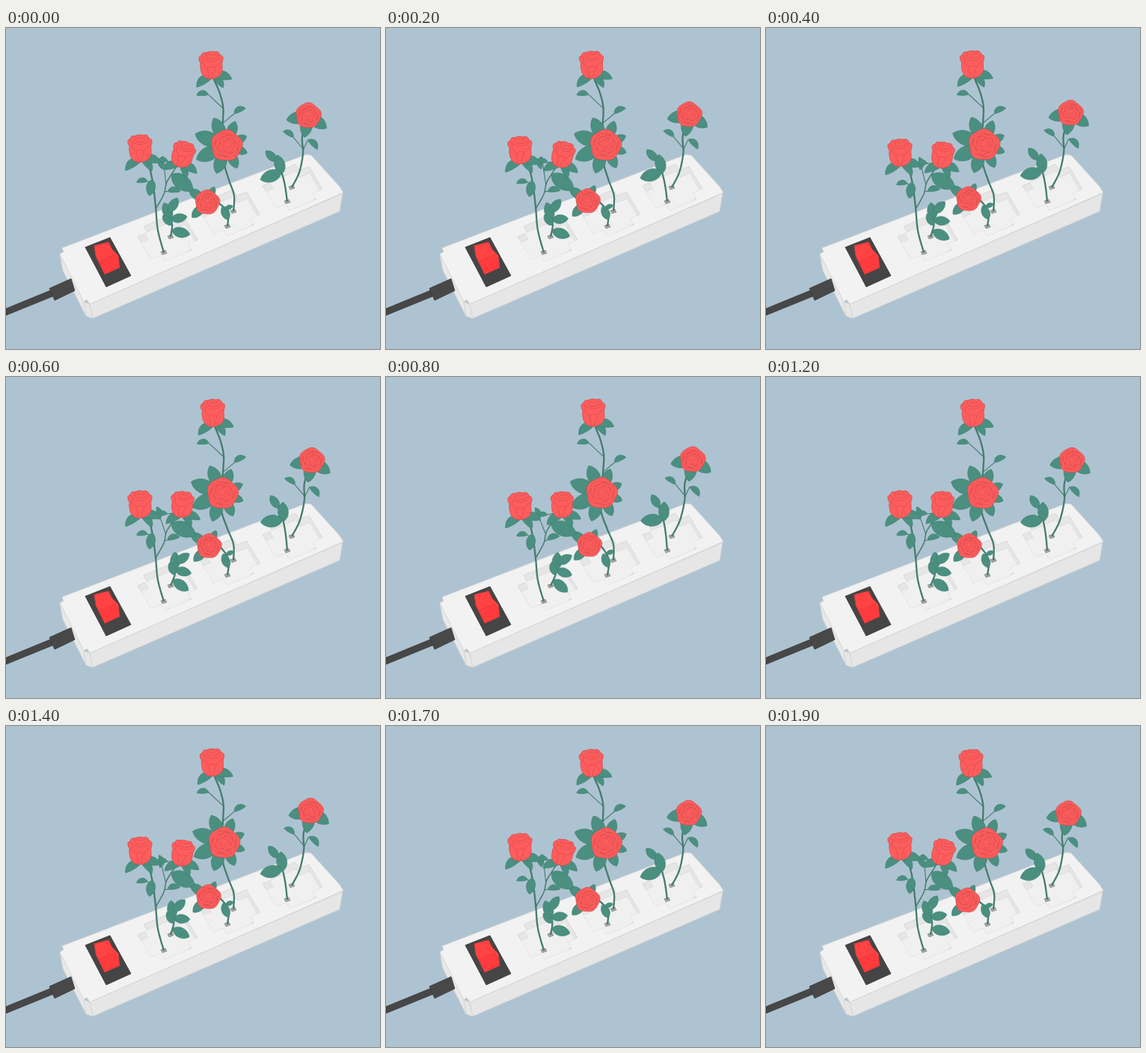
An HTML page with a canvas for the animation above (2 s loop, 500x429 px).

```html
<!DOCTYPE html>
<html lang="en">
<head>
<meta charset="utf-8">
<title>Power strip roses</title>
<style>
html, body { margin: 0; width: 100%; height: 100%; overflow: hidden; background: #aec3d1; }
canvas { display: block; width: 500px; height: 429px; }
</style>
</head>
<body>
<canvas id="stage" width="500" height="429"></canvas>
<script>
const ctx = document.getElementById('stage').getContext('2d');
const GREEN = '#4a8f80', GREEN_LINE = '#3f7d70', STEM = '#457b6d';
const RED = '#ff5d5d', RED_LINE = '#d54c4c', EDGE = '#d4d4d4';
const TAU = Math.PI * 2, rad = deg => deg * Math.PI / 180;

// stem: key points from the root to the flower's centre
// lean: how far the top drifts over the sway; turn: how far leaves rotate
// twigs: place on the stem (0..1), angle, stalk length, leaf length, droop
const plants = [
  { // right, tall
    stem: [382,213, 392,193, 397,167, 396,145, 404,117], lean: [6, -7],
    twigs: [[.56, -130, 20, 16, -20], [.54, -65, 15, 18, 110]],
    rose: { open: true, size: 17 },
  },
  { // right, leaves only
    stem: [376,232, 373,211, 369,195, 365,186, 360,174], lean: [4, -4], turn: .3,
    twigs: [[.9, -137, 0, 20], [.5, -105, 0, 26], [.55, 160, 0, 30]],
  },
  { // middle, top flower
    stem: [288,150, 290,122, 290,104, 285,85, 277,66, 274,50], lean: [3, -2],
    twigs: [[.36, -137, 27, 16, -45], [.16, -40, 20, 17, 15]],
    rose: { size: 1 },
  },
  { // middle, large flower
    stem: [304,245, 305,224, 298,203, 292,180, 295,157], lean: [-7, -2],
    ring: { count: 8, from: 20, step: 45, reach: 37 },
    rose: { open: true, size: 21 },
  },
  { // middle, small flower
    stem: [296,265, 297,250, 291,240, 280,232, 269,233], lean: [3, -9],
    twigs: [[.15, -112, 0, 20], [.45, -20, 0, 11]],
    ring: { count: 3, from: 135, step: 80, reach: 25 },
    rose: { open: true, size: 16.5 },
  },
  { // left, branch
    stem: [200,242, 211,222, 215,206, 226,188, 236,169], lean: [-1, 2], turn: -.3, width: 1.5,
    twigs: [[.3, 0, 4, 17], [.65, 38, 0, 36], [.45, -95, 38, 17, 190], [.85, 185, 14, 14]],
    rose: { size: .95, tilt: .35 },
  },
  { // left, tall
    stem: [211,300, 203,270, 200,238, 196,205, 190,182, 179,161], lean: [0, 12],
    twigs: [[.55, -135, 11, 15, -50], [.62, 100, 0, 22]],
    rose: { size: 1 },
  },
  { // left, leaves only
    stem: [220,279, 222,264, 219,252, 217,244], lean: [13, 4], turn: .5,
    twigs: [[.2, 12, 0, 25], [.55, -10, 0, 22], [.55, -113, 0, 24], [.9, -58, 0, 22], [.35, -135, 0, 18]],
  },
];

function poly(pts, fill, line, width = .8) {
  ctx.beginPath();
  for (let i = 0; i < pts.length; i += 2) ctx.lineTo(pts[i], pts[i + 1]);
  ctx.closePath();
  ctx.fillStyle = fill;
  ctx.fill();
  if (line) stroke(line, width);
}

function stroke(color, width, path) {
  ctx.strokeStyle = color;
  ctx.lineWidth = width;
  path ? ctx.stroke(path) : ctx.stroke();
}

// A plus-shaped outline walked along the strip (u) and across it (v)
function socketOutline() {
  const steps = [[.21, 0], [0, -.28], [.58, 0], [0, .28], [.21, 0], [0, 1]];
  const pts = [];
  let x = 0, y = 0;
  for (const sign of [1, -1])
    for (const [u, v] of steps) {
      pts.push(x, y);
      x += sign * (62 * u + 18 * v);
      y += sign * (-26 * u + 30 * v);
    }
  return pts;
}
const socket = socketOutline();

function drawSocket(x, y) {
  ctx.save();
  ctx.translate(x, y);
  poly(socket, '#e6e6e6', EDGE);
  ctx.clip();
  ctx.translate(1, 9);
  poly(socket, '#f0f0f0', '#dadada');
  ctx.restore();
}

function drawStrip() {
  poly([72,302, 104,366, 107,385, 76,324], '#e9e9e9', EDGE);
  poly([104,366, 112,369, 116,388, 107,385], '#e6e6e6', EDGE);
  poly([112,369, 450,221, 446,245, 116,388], '#e6e6e6', EDGE);
  poly([72,302, 77,299, 75,294, 396,171, 402,169, 408,170, 446,212, 451,220,
    112,369, 108,363, 104,366], '#f2f2f2', EDGE);
  for (let i = 0; i < 3; i++) drawSocket(176 + i * 83.5, 279 - i * 34);

  // cable and plug
  poly([0,375, 61,350, 64,358, 0,384], '#474747', '#3a3a3a');
  poly([58,348, 87,335, 92,351, 65,364], '#484848', '#3a3a3a');

  // switch
  poly([106,293, 139,280, 167,331, 134,346], '#454545', '#353535');
  poly([118,291, 137,286, 142,296, 150,304, 152,320, 132,329, 120,305], '#ff4343', '#d03a3a');
  poly([124,312, 146,303, 152,320, 132,329], '#ff3b3d', '#d93c3c', .6);
}

// Smooth curve through the key points; t runs from 0 to 1
function pointOn(pts, t) {
  const n = pts.length - 1, i = Math.min(n - 1, Math.floor(t * n)), f = t * n - i;
  const at = k => pts[Math.max(0, Math.min(n, k))];
  const [a, b, c, d] = [at(i - 1), at(i), at(i + 1), at(i + 2)];
  return [0, 1].map(k => b[k] + f / 2 * (c[k] - a[k]
    + f * (2 * a[k] - 5 * b[k] + 4 * c[k] - d[k] + f * (3 * (b[k] - c[k]) + d[k] - a[k]))));
}

// Moves each key point by its share of the lean, more towards the top
function bend({ stem, lean }, sway) {
  const rootY = stem[1], height = rootY - stem[stem.length - 1], pts = [];
  for (let i = 0; i < stem.length; i += 2) {
    const share = sway * ((rootY - stem[i + 1]) / height) ** 1.3;
    pts.push([stem[i] + lean[0] * share, stem[i + 1] + lean[1] * share]);
  }
  return pts;
}

function drawStem(pts, width) {
  ctx.beginPath();
  for (let i = 0; i <= 40; i++) ctx.lineTo(...pointOn(pts, i / 40));
  stroke(STEM, width);
}

// An arched leaf bulges upwards only
function drawLeaf(x, y, angle, length, arched) {
  const side = Math.cos(angle) < 0 ? 1 : -1;
  const upper = side * length * (arched ? .5 : .36), lower = -side * length * (arched ? .1 : .36);
  ctx.save();
  ctx.translate(x, y);
  ctx.rotate(angle);
  ctx.beginPath();
  ctx.moveTo(0, 0);
  ctx.bezierCurveTo(length * .2, upper, length * .75, upper, length, 0);
  ctx.bezierCurveTo(length * .75, lower, length * .2, lower, 0, 0);
  ctx.fillStyle = GREEN;
  ctx.fill();
  stroke(GREEN_LINE, .5);
  ctx.restore();
}

function drawTwig(pts, [t, deg, stalk, length, droop = 0], turn) {
  const [x, y] = pointOn(pts, t), angle = rad(deg) + turn;
  const endX = x + stalk * Math.cos(angle), endY = y + stalk * Math.sin(angle);
  ctx.beginPath();
  ctx.moveTo(x, y);
  ctx.lineTo(endX, endY);
  stroke(STEM, 1.1);
  drawLeaf(endX, endY, angle + rad(droop), length, stalk > 0);
}

// Leaves around a flower, longer on its left
function drawRing([x, y], { count, from, step, reach }) {
  for (let i = 0; i < count; i++) {
    const angle = rad(from + i * step), start = reach * .25;
    const length = reach * (.75 - .22 * Math.cos(angle));
    drawLeaf(x + start * Math.cos(angle), y + start * Math.sin(angle), angle, length);
  }
}

const budShape = new Path2D(`M-16-8Q-17-12-13-13Q-12-18-7-17Q-1-20 4-18Q11-20 12-14Q17-13 16-8
  Q14-4 15 2Q16 11 10 15Q4 19-3 18Q-10 17-13 9Q-15 2-14-4Q-16-5-16-8Z`);
const budFolds = new Path2D(`M-14-4Q-8-2-5 4Q-2 12-3 18M-13-13Q-9-9-10-3M-7-17Q-8-12-4-9Q4-7 12-14
  M-4-15Q1-12 8-16M-9-9Q-3-4 4-6Q10-7 12-11M15-5Q9-3 6 3Q3 11 1 18M-5 4Q0 0 6 3`);

function drawBud(size) {
  ctx.scale(size, size);
  for (const [deg, length] of [[148, 25], [45, 20], [5, 26]])
    drawLeaf(2, 16, rad(deg), length, true);
  ctx.fillStyle = RED;
  ctx.fill(budShape);
  stroke(RED_LINE, .8, budShape);
  stroke(RED_LINE, .7, budFolds);
}

function drawOpen(radius) {
  ctx.beginPath();
  for (let a = 0; a < TAU; a += .1) {
    const r = radius * (.97 + .04 * Math.cos(5 * a + 1) + .02 * Math.cos(3 * a));
    ctx.lineTo(r * Math.cos(a), r * Math.sin(a));
  }
  ctx.closePath();
  ctx.fillStyle = RED;
  ctx.fill();
  stroke(RED_LINE, .8);
  // overlapping petal rims, tighter towards the heart
  for (let ring = 0; ring < 5; ring++) {
    const r = radius * (.84 - ring * .155), petals = ring < 3 ? 4 : 3;
    for (let i = 0; i < petals; i++) {
      ctx.beginPath();
      for (let k = 0; k <= 10; k++) {
        const a = ring * .8 + i * TAU / petals + k * .21;
        const d = r * (.86 + .16 * Math.sin(k * Math.PI / 10));
        ctx.lineTo(d * Math.cos(a), d * Math.sin(a) * .92 - ring * .4);
      }
      stroke(RED_LINE, .7);
    }
  }
}

function drawRose([x, y], { open, size, tilt = 0 }, turn, sepals) {
  ctx.save();
  ctx.translate(x, y);
  if (sepals) for (const deg of [168, 100, 35]) drawLeaf(0, 0, rad(deg), size * 1.75);
  ctx.rotate(tilt + turn);
  (open ? drawOpen : drawBud)(size);
  ctx.restore();
}

function drawPlant(plant, sway) {
  const { twigs = [], ring, rose, turn = 0, width = 2.3 } = plant;
  const pts = bend(plant, sway), [x, y] = pts[0], top = pts[pts.length - 1];
  if (y > 200 && width > 2) poly([x - 4,y - 1, x + 2,y - 3, x + 4,y + 1, x - 2,y + 3], '#a3a7a1', '#777d77', .6);
  drawStem(pts, width);
  for (const twig of twigs) drawTwig(pts, twig, turn * sway);
  if (ring) drawRing(top, ring);
  if (rose) drawRose(top, rose, turn * sway, rose.open && !ring);
}

function draw(time) {
  const step = Math.floor(time % 2000 / 100) * 100;
  const sway = (1 - Math.cos((step + 100) * Math.PI / 1000)) / 2;
  ctx.fillStyle = '#aec3d1';
  ctx.fillRect(0, 0, 500, 429);
  drawStrip();
  for (const plant of plants) drawPlant(plant, sway);
}

ctx.lineJoin = 'round';
const start = performance.now();
function tick() {
  draw(performance.now() - start);
  requestAnimationFrame(tick);
}
tick();
</script>
</body>
</html>
```
